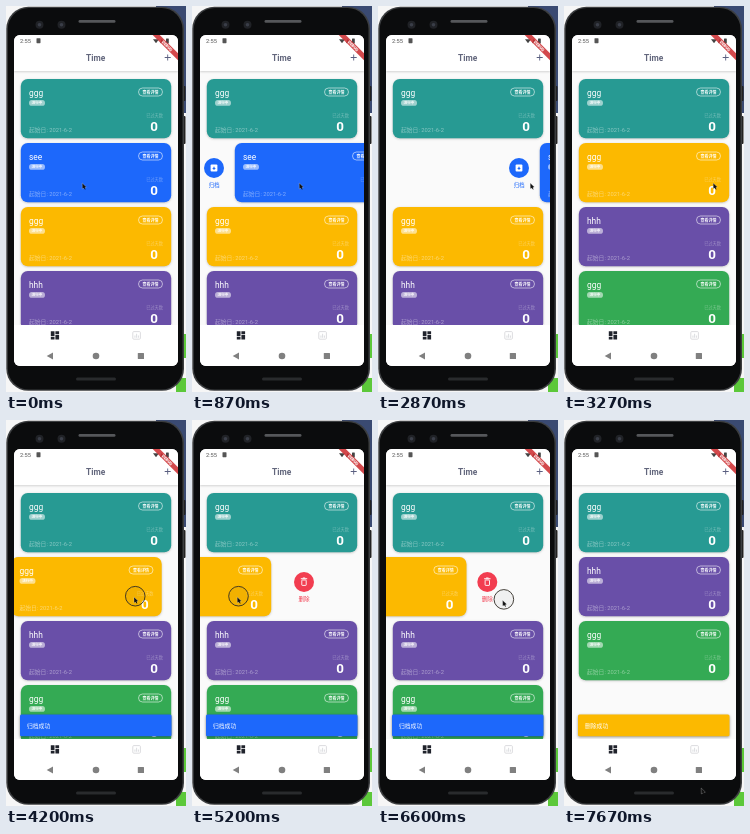
Write an HTML page with a canvas that moves like this. It is 180 by 386 pixels and loops after 7.73 s.

```html
<!DOCTYPE html>
<html lang="zh">
<head>
<meta charset="utf-8">
<title>Time</title>
<style>
html, body { margin: 0; width: 100%; height: 100%; overflow: hidden; background: #fff; }
canvas { display: block; width: 180px; height: 386px; }
</style>
</head>
<body>
<canvas id="stage"></canvas>
<script>
const W = 180, H = 386, LOOP = 7730;
const FONT = 'Roboto, "Noto Sans CJK SC", "Noto Sans CJK", sans-serif';
const TEAL = '#279a93', BLUE = '#1d68fb', YELLOW = '#fcb900',
      PURPLE = '#694fa8', GREEN = '#34aa54', RED = '#f23d50';
const CARD = { x: 15, y: 73, w: 150, h: 59, pitch: 64 };

const canvas = document.getElementById('stage');
const ctx = canvas.getContext('2d');
const ratio = window.devicePixelRatio || 1;
canvas.width = W * ratio;
canvas.height = H * ratio;

// The whole pose follows from smooth glides that add up over time.
function pose(t) {
  const glide = (from, to, by = 1) => {
    const k = Math.min(1, Math.max(0, (t - from) / (to - from)));
    return by * k * k * (3 - 2 * k);
  };
  const during = (from, to) => t >= from && t <= to;
  const reveal = glide(200, 800), archive = glide(1750, 2870);
  const pull = glide(3940, 5200), back = glide(5200, 5500), fling = glide(6400, 6900);
  const leave = glide(7000, 7670);
  return {
    blue: 28 * reveal + 119 * archive + glide(2870, 3000, 23),
    blueSize: 1 - glide(3000, 3270),
    yellow: -86 * pull + 60 * back - 144 * fling,
    yellowSize: 1 - glide(7000, 7270),
    deleteGap: 33 - 12 * back,
    archived: glide(3270, 3540) - glide(7000, 7200),
    deleted: glide(7200, 7470),
    x: 77 + 31 * reveal - glide(900, 1600, 53) + 98 * archive - glide(3000, 3900, 14)
      - 93 * pull - glide(5500, 6070, 13) + glide(6100, 6400, 117) - 70 * fling + 58 * leave,
    y: 177 + 9 * fling + 182 * leave,
    pressed: during(200, 800) || during(1750, 2800) || during(3940, 5200) || during(6400, 6900)
  };
}

function box(x, y, w, h, r, fill) {
  ctx.beginPath();
  ctx.roundRect(x, y, w, h, r);
  if (fill) {
    ctx.fillStyle = fill;
    ctx.fill();
  }
}

function outline(color, width) {
  ctx.strokeStyle = color;
  ctx.lineWidth = width;
  ctx.stroke();
}

function disc(x, y, r, fill) {
  ctx.beginPath();
  ctx.arc(x, y, r, 0, Math.PI * 2);
  ctx.fillStyle = fill;
  ctx.fill();
}

// Triangle with its tip at x, y; len and half give its reach along the angle.
function wedge(x, y, len, half, angle, fill) {
  ctx.save();
  ctx.translate(x, y);
  ctx.rotate(angle);
  ctx.beginPath();
  ctx.moveTo(0, 0);
  ctx.lineTo(len, -half);
  ctx.lineTo(len, half);
  ctx.closePath();
  ctx.restore();
  ctx.fillStyle = fill;
  ctx.fill();
}

function label(str, x, y, size, fill, align = 'left', weight = 400) {
  ctx.font = `${weight} ${size}px ${FONT}`;
  ctx.textAlign = align;
  ctx.fillStyle = fill;
  ctx.fillText(str, x, y);
}

function raised(alpha, blur, paint) {
  ctx.save();
  ctx.shadowColor = `rgba(0,0,0,${alpha})`;
  ctx.shadowBlur = blur * ratio;
  ctx.shadowOffsetY = blur * ratio / 3;
  paint();
  ctx.restore();
}

function drawPhone() {
  box(0, 0, W, H, 0, '#f6f6f6');
  box(150, 0, 30, 107, 0, '#3a4a72');
  box(170, 328, 10, 24, 0, '#5cc83a');
  box(170, 372, 10, 14, 0, '#5cc83a');
  box(176, 80, 3.5, 15, 1, '#222');
  box(176, 110, 3.5, 28, 1, '#222');
  box(0.3, 0.8, 177.7, 384, 22, '#3c3e40');
  box(1.8, 2, 174.7, 381.5, 21, '#0b0c0d');
  box(72.5, 14, 37, 2.8, 1.4, '#55575a');
  box(70, 371.5, 40, 3, 1.5, '#292b2d');
  for (const x of [33.5, 55.5]) {
    disc(x, 18.7, 4, '#202226');
    disc(x, 18.7, 1.8, '#3a3e48');
  }
}

function drawCard(y, color, name, dx) {
  ctx.save();
  ctx.translate(CARD.x + dx, y);
  raised(0.22, 2.4, () => box(-0.2, 0, CARD.w + 0.4, CARD.h + 0.2, 7, color));
  label(name, 8, 17.2, 8.4, '#fff');
  box(8, 21, 16, 5.8, 2.9, 'rgba(255,255,255,.55)');
  label('进行中', 16, 25.2, 3.6, '#fff', 'center', 700);
  label('起始日: 2021-6-2', 8, 53.3, 5.8, 'rgba(255,255,255,.45)');
  box(117.5, 9, 24, 8, 4);
  outline('rgba(255,255,255,.8)', 0.7);
  label('查看详情', 129.5, 14.6, 4, '#fff', 'center', 700);
  label('已过天数', 142, 37.8, 4.2, 'rgba(255,255,255,.35)', 'right');
  label('0', 133.2, 52, 13.4, '#fff', 'center', 700);
  ctx.restore();
}

function drawAction(x, y, color, text) {
  disc(x, y, 10, color);
  if (color === RED) {
    box(x - 2.2, y - 2, 4.4, 5.4, 0.5);
    outline('#fff', 0.9);
    box(x - 3.2, y - 3.7, 6.4, 1, 0, '#fff');
    box(x - 1.2, y - 4.5, 2.4, 1, 0, '#fff');
  } else {
    box(x - 3.4, y - 3.4, 6.8, 6.8, 1, '#fff');
    box(x - 0.6, y - 1.2, 1.2, 1.6, 0, color);
    wedge(x, y + 2, 2, 1.8, -Math.PI / 2, color);
  }
  label(text, x, y + 18.8, 5.6, color, 'center');
}

function drawList(p) {
  const rows = [
    [TEAL, 'ggg', 0, 1], [BLUE, 'see', p.blue, p.blueSize],
    [YELLOW, 'ggg', p.yellow, p.yellowSize], [PURPLE, 'hhh', 0, 1], [GREEN, 'ggg', 0, 1]
  ];
  let y = CARD.y;
  for (const [color, name, dx, size] of rows) {
    if (size === 1) {
      if (dx > 0) drawAction(CARD.x + dx - 21, y + 25, BLUE, '归档');
      if (dx < 0) drawAction(CARD.x + CARD.w + dx + p.deleteGap, y + 25, RED, '删除');
      drawCard(y, color, name, dx);
    }
    y += CARD.pitch * size;
  }
}

function drawSnack(rise, color, text) {
  if (rise <= 0) return;
  const y = 294.4 + 26 * (1 - rise);
  raised(0.4, 3, () => box(14, y, 151.5, 21.8, 1.5, color));
  label(text, 21, y + 13.2, 5.8, '#fff');
}

function drawTop() {
  raised(0.16, 2, () => box(8, 29, 164, 36, 0, '#fff'));
  label('2:55', 14, 37, 5.7, '#555');
  box(30.5, 32.2, 4, 5, 0.6, '#555');
  wedge(150, 37.2, 4, 3, -Math.PI / 2, '#444');
  wedge(154, 37.2, 4, 2, -Math.PI / 4, '#444');
  box(160, 32.5, 2.8, 5, 0.5, '#444');
  label('Time', 89.7, 54.5, 8.4, '#62667c', 'center', 700);
  box(158.7, 51, 6, 0.9, 0, '#5a5f80');
  box(161.25, 48.4, 0.9, 6, 0, '#5a5f80');
  ctx.save();
  ctx.translate(161.2, 40);
  ctx.rotate(Math.PI / 4);
  box(-18, -2.5, 36, 5, 0, 'rgba(205,48,52,.88)');
  label('DEBUG', 0, 1.4, 4.1, '#fff', 'center', 900);
  ctx.restore();
}

function drawBottom() {
  box(8, 319, 164, 42, 0, '#fff');
  for (const i of [0, 1]) {
    for (const j of [0, 1]) {
      const h = i === j ? 4.6 : 2.9;
      box(44.8 + 4.6 * i, 325.3 + j * (8.3 - h), 3.7, h, 0, '#20232c');
    }
  }
  box(126.8, 325.6, 7.6, 7.6, 1);
  outline('#d8d9dc', 0.9);
  for (let i = 0; i < 3; i++) {
    const h = 4 - Math.abs(i - 1) * 1.8;
    box(128.5 + i * 1.7, 331.7 - h, 0.9, h, 0, '#d8d9dc');
  }
  wedge(40.7, 350, 6.3, 3.6, 0, '#808080');
  disc(90, 350, 3.3, '#808080');
  box(131.8, 346.9, 6.2, 6.2, 0.5, '#808080');
}

function drawPointer({ x, y, pressed }) {
  if (pressed) {
    disc(x + 0.5, y - 0.8, 9.8, 'rgba(0,0,0,.04)');
    outline('#302c25', 0.9);
  }
  wedge(x - 0.8, y, 5.4, 2.2, Math.PI * 0.37, '#111');
  outline('rgba(255,255,255,.6)', 0.4);
  ctx.beginPath();
  ctx.moveTo(x + 1, y + 4);
  ctx.lineTo(x + 2.1, y + 6.4);
  outline('#111', 1);
}

function draw(t) {
  const p = pose(t);
  ctx.setTransform(ratio, 0, 0, ratio, 0, 0);
  drawPhone();
  ctx.save();
  box(8, 29, 164, 331, 6, '#fafafa');
  ctx.clip();
  drawList(p);
  drawSnack(p.archived, BLUE, '归档成功');
  drawSnack(p.deleted, YELLOW, '删除成功');
  drawTop();
  drawBottom();
  ctx.restore();
  drawPointer(p);
}

// The picture changes twice every 200 ms, with two short holds.
function step(ms) {
  const t = ms % LOOP, base = Math.floor(t / 200) * 200;
  const held = base === 5600 || base === 6800;
  return base + (t - base >= 70 && !held ? 70 : 0);
}

let start = null;
function tick(now) {
  if (start === null) start = now;
  draw(step(now - start));
  requestAnimationFrame(tick);
}
draw(0);
requestAnimationFrame(tick);
</script>
</body>
</html>
```
